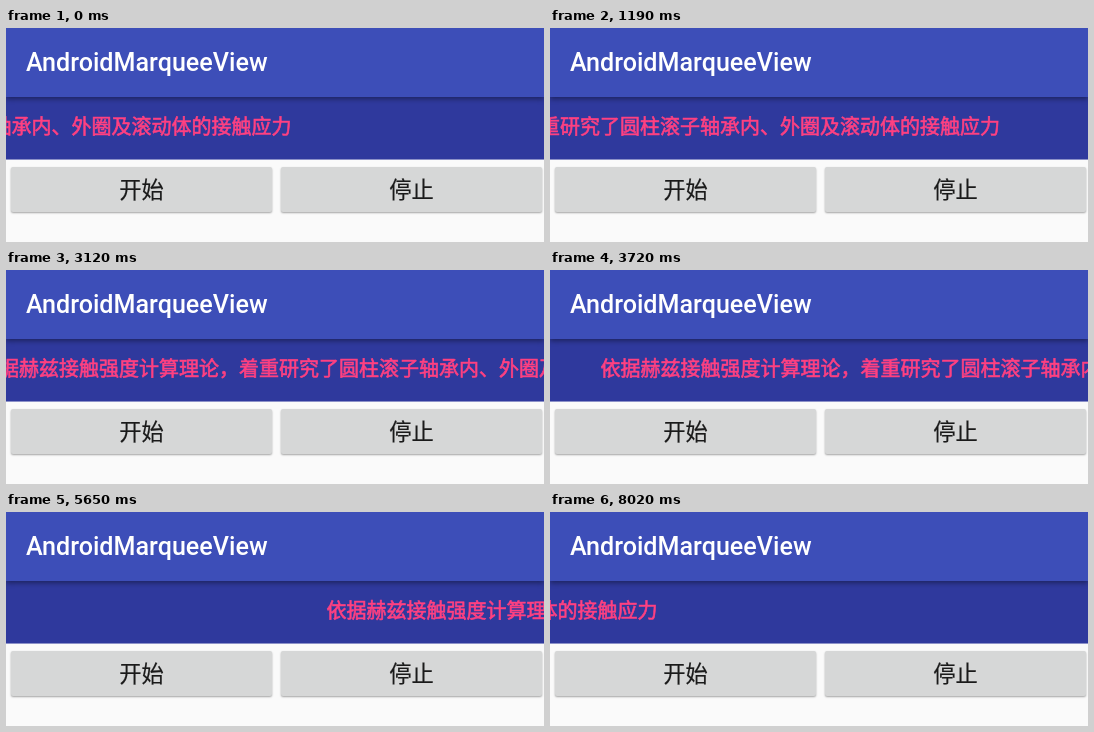
An HTML page for the animation above (8.06 s loop, 538 by 214 pixels).

```html
<!DOCTYPE html>
<html lang="zh-CN">
<head>
<meta charset="utf-8">
<style>
  html, body { margin: 0; width: 100%; height: 100%; overflow: hidden; background: #fafafa; }
  body { position: relative; }
  div { position: absolute; white-space: nowrap; box-sizing: border-box; }
  .bar { left: 0; top: 0; width: 100%; height: 69px; padding-left: 20px; background: #3d4eb8; color: #fff;
    font: 500 25.1px/70px Roboto, sans-serif; box-shadow: 0 2px 5px rgba(0, 0, 0, .4); }
  .strip { left: 0; top: 69px; width: 100%; height: 63px; background: #2f399d; overflow: hidden;
    border-bottom: 1px solid #8c91c8; }
  .text { top: -1px; color: #ff4081; font: 20px/60px "Noto Sans CJK SC", "Noto Sans CJK", sans-serif;
    -webkit-text-stroke: .6px #ff4081; }
  .button { top: 139px; width: 261px; height: 45px; border-radius: 2px; background: #d6d7d7; color: #1a1a1a;
    text-align: center; font: 22.3px/43px "Noto Sans CJK SC", "Noto Sans CJK", sans-serif;
    -webkit-text-stroke: .2px #1a1a1a; box-shadow: 0 1px 2px rgba(0, 0, 0, .35); }
</style>
</head>
<body>
<div class="strip"><div class="text" id="text">依据赫兹接触强度计算理论，着重研究了圆柱滚子轴承内、外圈及滚动体的接触应力</div></div>
<div class="bar">AndroidMarqueeView</div>
<div class="button" style="left:5px">开始</div>
<div class="button" style="left:275px">停止</div>
<script>
  const LOOP = 8060, STEPS = 54, STAGE = 538, WIDTH = 740;
  // [step, left edge], unwrapped; the text moves in steps of about 20 px
  const path = [[0, -454.5], [8, -290], [14, -169], [21, -27], [24, 29], [30, 158],
    [32, 202], [38, 320.5], [40, 358], [54, 645.5]];
  const text = document.getElementById('text');

  const startOf = n => 150 * n - 10 * Math.floor(.15 * n + .1);

  function stepAt(t) {
    let n = STEPS;
    while (n > 0 && startOf(n) > t) n--;
    return n;
  }

  function leftAt(n) {
    const i = path.findIndex(p => p[0] >= n);
    const [n1, x1] = path[i];
    if (n1 === n) return x1;
    const [n0, x0] = path[i - 1];
    return x0 + (x1 - x0) * (n - n0) / (n1 - n0);
  }

  const begin = performance.now();
  function draw() {
    const t = Math.max(0, performance.now() - begin) % LOOP;
    let x = leftAt(stepAt(t));
    if (x > STAGE) x -= STAGE + WIDTH;
    text.style.transform = `translateX(${x}px)`;
    requestAnimationFrame(draw);
  }
  draw();
</script>
</body>
</html>
```
